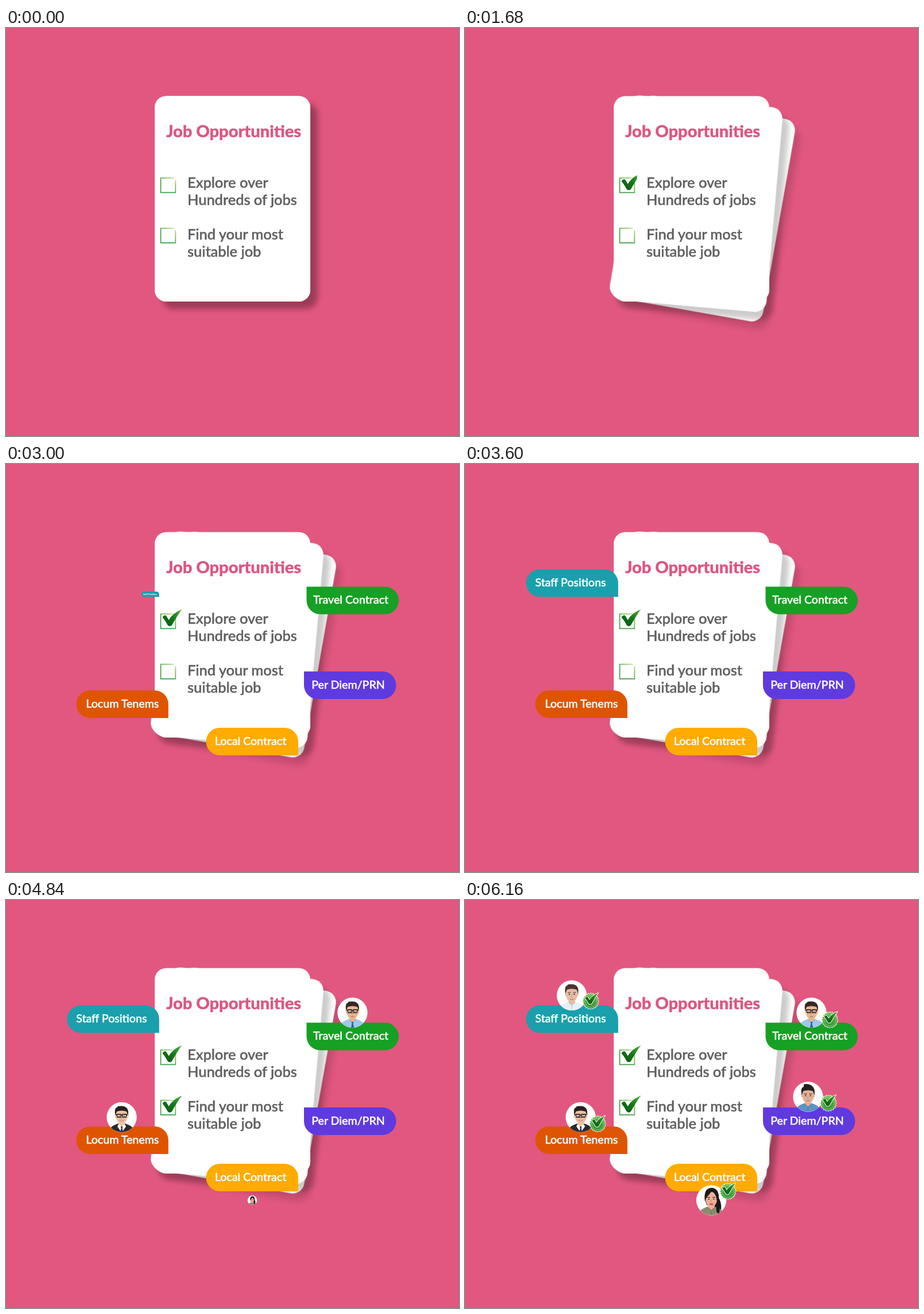
These frames come from a looping animation (789 px wide and 710 px high, 6.72 s). An HTML page:

```html
<!DOCTYPE html>
<html lang="en">
<head>
<meta charset="utf-8">
<title>Job Opportunities</title>
<style>
  html, body { margin: 0; width: 100%; height: 100%; overflow: hidden; background: #e2577f; }
  svg { display: block; width: 789px; height: 710px; font-family: Lato, "Open Sans", sans-serif; }
  .sheet { fill: #fff; }
  .middle { filter: drop-shadow(13px 13px 4px rgba(0, 0, 0, .2)); }
  .bottom { filter: drop-shadow(12px 12px 6px rgba(0, 0, 0, .13)); }
  .title { font-size: 29px; font-weight: 800; fill: #dd5680; stroke: #dd5680; stroke-width: .4px; }
  .item { font-size: 25.4px; font-weight: 500; fill: #5f5f5f; stroke: #5f5f5f; stroke-width: .5px; }
  .tag { font-size: 19.6px; font-weight: 500; fill: #fff; stroke: #fff; stroke-width: .5px; text-anchor: middle; }
</style>
</head>
<body>
<svg id="stage" viewBox="0 0 789 710">
  <defs>
    <linearGradient id="edge" x1="0" y1="1" x2="1" y2="0">
      <stop offset=".4" stop-color="#3f9f46"/>
      <stop offset=".8" stop-color="#8cc85a"/>
      <stop offset="1" stop-color="#d8f0c4"/>
    </linearGradient>
    <linearGradient id="ink" x1="0" y1="1" x2="1" y2="0">
      <stop offset="0" stop-color="#0a5410"/>
      <stop offset=".5" stop-color="#15761a"/>
      <stop offset="1" stop-color="#4fb53c"/>
    </linearGradient>
    <linearGradient id="leaf" x1="0" y1="0" x2="0" y2="1">
      <stop offset="0" stop-color="#6fbd4c"/>
      <stop offset="1" stop-color="#2a9136"/>
    </linearGradient>
    <clipPath id="round"><circle r="26"/></clipPath>
    <clipPath id="wipe0"><rect x="0" y="-10" width="0" height="40"/></clipPath>
    <clipPath id="wipe1"><rect x="0" y="-10" width="0" height="40"/></clipPath>
    <path id="mark" d="M4 7C6 3 10 2 11.5 5.5L15 11.5C20 3 28-3 38-7C32 0 28 8 21 19.5C19 23 14.5 23 12.5 19.5Q8 11 4 7Z"/>
  </defs>
</svg>
<script>
const LOOP = 6720, STEP = 40;
const stage = document.getElementById('stage');

function add(html) {
  const g = document.createElementNS('http://www.w3.org/2000/svg', 'g');
  g.innerHTML = html;
  return stage.appendChild(g);
}

const progress = (t, start, length) => Math.min(1, Math.max(0, (t - start) / length));
const easeOut = p => 1 - (1 - p) ** 3;

function scaleAt(node, x, y, s) {
  node.style.display = s > 0 ? '' : 'none';
  node.setAttribute('transform', `translate(${x} ${y}) scale(${s})`);
}

// Paper stack
const sheets = ['bottom', 'middle', 'front'].map((name, i) => ({
  depth: 2 - i,
  node: add(`<rect class="sheet ${name}" x="-135.5" y="-178.7" width="271" height="357.4" rx="20"/>`)
}));

const line = (y, text) => `<text class="item" x="316" y="${y}">${text}</text>`;
add('<text class="title" x="279" y="189.8">Job Opportunities</text>' +
  line(278, 'Explore over') + line(308, 'Hundreds of jobs') +
  line(368, 'Find your most') + line(398, 'suitable job'));

// Checkboxes
const checks = [{ y: 260, start: 1400 }, { y: 347.5, start: 3840 }];
checks.forEach(({ y }, i) => add(`<g transform="translate(268.5 ${y})">
  <path d="M24.5 1H1V26.3H26.8V4" fill="none" stroke="url(#edge)" stroke-width="1.7"/>
  <g clip-path="url(#wipe${i})"><use href="#mark" fill="url(#ink)"/></g></g>`));

// Tags grow out of their square corner
const W = 160.5, H = 48, R = 24;
const tagShape = `M0 0H${W - R}A${R} ${R} 0 0 1 ${W - R} ${H}H${R}A${R} ${R} 0 0 1 0 ${H - R}Z`;
const people = [
  { label: 'Travel Contract', color: '#16a024', x: 523.5, y: 213.5, mid: 77, corner: 0,
    face: [603.5, 196], badge: [635.5, 208.5],
    look: { skin: '#e9b48c', hair: '#352723', shirt: '#9dc8ea', tie: '#2d6ca5', glasses: 1 } },
  { label: 'Per Diem/PRN', color: '#5f3adf', x: 519, y: 361, mid: 77, corner: 0,
    face: [597.5, 342.5], badge: [633, 353.5], order: 3,
    look: { skin: '#e2b097', hair: '#25211f', shirt: '#5b94c4', tall: 1 } },
  { label: 'Local Contract', color: '#ffab00', x: 348.5, y: 459, mid: 77.5, corner: 1,
    face: [429, 522.5], badge: [458, 507], order: 2,
    look: { skin: '#f0b09a', hair: '#1d191c', shirt: '#8c8a6d', long: 1 } },
  { label: 'Locum Tenems', color: '#df5400', x: 122.3, y: 394, mid: 80.5, corner: 1,
    face: [201.5, 378], badge: [231, 389.5], order: 1,
    look: { skin: '#f1c0a0', hair: '#24201f', shirt: '#2a2b31', tie: '#273a66', suit: 1, glasses: 1 } },
  { label: 'Staff Positions', color: '#1a9fad', x: 106.3, y: 183.3, mid: 77.5, corner: 1,
    face: [186, 166], badge: [219, 176], order: 4,
    look: { skin: '#e6bca3', hair: '#49352d', shirt: '#e6f0f7' } }
];

function portrait({ skin, hair, shirt, tie, glasses, suit, tall, long }) {
  const top = tall ? -22 : -19;
  let s = '<circle r="26.2" fill="#fff"/><g clip-path="url(#round)">';
  if (long) s += `<path d="M-11 0C-14-28 14-28 13-4C19 6 18 18 14 24L5 14L-8 8Z" fill="${hair}"/>`;
  s += `<path d="M-22 27C-21 16-14 14-6 11H6C14 14 21 16 22 27Z" fill="${shirt}"/>
    <path d="M-5.5 4H5.5V12L0 17L-5.5 12Z" fill="${skin}"/>`;
  if (suit) s += '<path d="M-5.5 12L0 16L5.5 12L7.5 16L0 27L-7.5 16Z" fill="#fff"/>';
  if (tie) s += `<path d="M-2 16H2L1 19L3 27H-3L-1 19Z" fill="${tie}"/>`;
  if (!suit) s += '<path d="M-6 12L0 18L6 12M0 18V26" fill="none" stroke="#0003"/>';
  if (long) s += `<path d="M8 4C15 8 16 16 13 24L9 20Z" fill="${hair}"/>`;
  else s += `<path d="M-10-5C-13-5-12 2-9 2M10-5C13-5 12 2 9 2" fill="${skin}"/>`;
  s += `<path d="M-10.5-9C-11 2-8 11 0 12C8 11 11 2 10.5-9Q0-20-10.5-9Z" fill="${skin}"/>`;
  s += long
    ? `<path d="M-11 2C-14-17-6-23 2-21C12-20 14-10 13 8L9-1C9-9 4-13 1-17C-2-10-8-8-11 2Z" fill="${hair}"/>`
    : `<path d="M-11-3C-13-12-11-17-8-17L-7 ${top}C4 ${top - 2} 14-18 11-3L8.5-10Q0-13-8.5-10Z" fill="${hair}"/>`;
  s += `<path d="M-7-5H-2M2-5H7" stroke="${hair}" stroke-width="1.2"/>
    <path d="M-5.5-2H-3M3-2H5.5" stroke="#2b2422" stroke-width="1.7"/>
    <path d="M0-2L-1 3H1" fill="none" stroke="#0003" stroke-width=".8"/>`;
  if (glasses) s += `<path d="M-8.5-5H-1.5V0H-7.5ZM1.5-5H8.5L7.5 0H1.5ZM-1.5-3.5H1.5M-10-4H-8M8-4H10"
    fill="#fff5" stroke="#1b1b1e" stroke-width="1.3"/>`;
  s += suit
    ? '<path d="M-4 5Q0 7 4 5Q0 10-4 5Z" fill="#fff" stroke="#a64c46" stroke-width=".6"/>'
    : `<path d="M-3 6.5Q0 7.5 3 6.5" fill="none" stroke="${long ? '#c9323f' : '#b06d5d'}" stroke-width="${long ? 2 : 1.1}"/>`;
  return s + '</g>';
}

const burst = Array.from({ length: 40 }, (_, i) => {
  const r = i % 2 ? 12.4 : 14.6, a = i * Math.PI / 20;
  return `${(r * Math.cos(a)).toFixed(1)},${(r * Math.sin(a)).toFixed(1)}`;
}).join(' ');
const badgeArt = `<polygon points="${burst}" fill="url(#leaf)" stroke="#eef8e6" stroke-width="1"/>
  <circle r="10.5" fill="none" stroke="#a5dc82" stroke-width=".7"/>
  <use href="#mark" transform="translate(-12.4 -9.7) scale(.68)" fill="url(#ink)"
    stroke="#fff" stroke-width="2.6" paint-order="stroke"/>`;

for (const p of people) {
  const turn = p.corner ? 'rotate(180)' : '';
  const [dx, dy] = p.corner ? [W, H] : [0, 0];
  p.anchor = [p.x + dx, p.y + dy];
  p.tag = add(`<path d="${tagShape}" transform="${turn}" fill="${p.color}"/>
    <text class="tag" x="${p.mid - dx}" y="${29.7 - dy}">${p.label}</text>`);
}
for (const p of people) p.avatar = add(portrait(p.look));
for (const p of people) p.seal = add(badgeArt);

function draw(t) {
  const fan = easeOut(progress(t, 400, 440));
  for (const { depth, node } of sheets) {
    const k = depth * fan;
    node.setAttribute('transform', `translate(${394.5 + 9.5 * k} ${297.2 + 8.5 * k}) rotate(${5 * k})`);
  }
  checks.forEach(({ start }, i) =>
    document.querySelector(`#wipe${i} rect`).setAttribute('width', 40 * progress(t, start, 360)));
  people.forEach((p, i) => {
    scaleAt(p.tag, ...p.anchor, progress(t, 1920 + 260 * i, 208));
    scaleAt(p.avatar, ...p.face, progress(t, 4400 + 190 * (p.order || 0), 190));
    scaleAt(p.seal, ...p.badge, progress(t, 5800, 360));
  });
}

const begin = performance.now();
function tick() {
  const t = (performance.now() - begin) % LOOP;
  draw(Math.floor(t / STEP) * STEP);
  requestAnimationFrame(tick);
}
tick();
</script>
</body>
</html>
```
